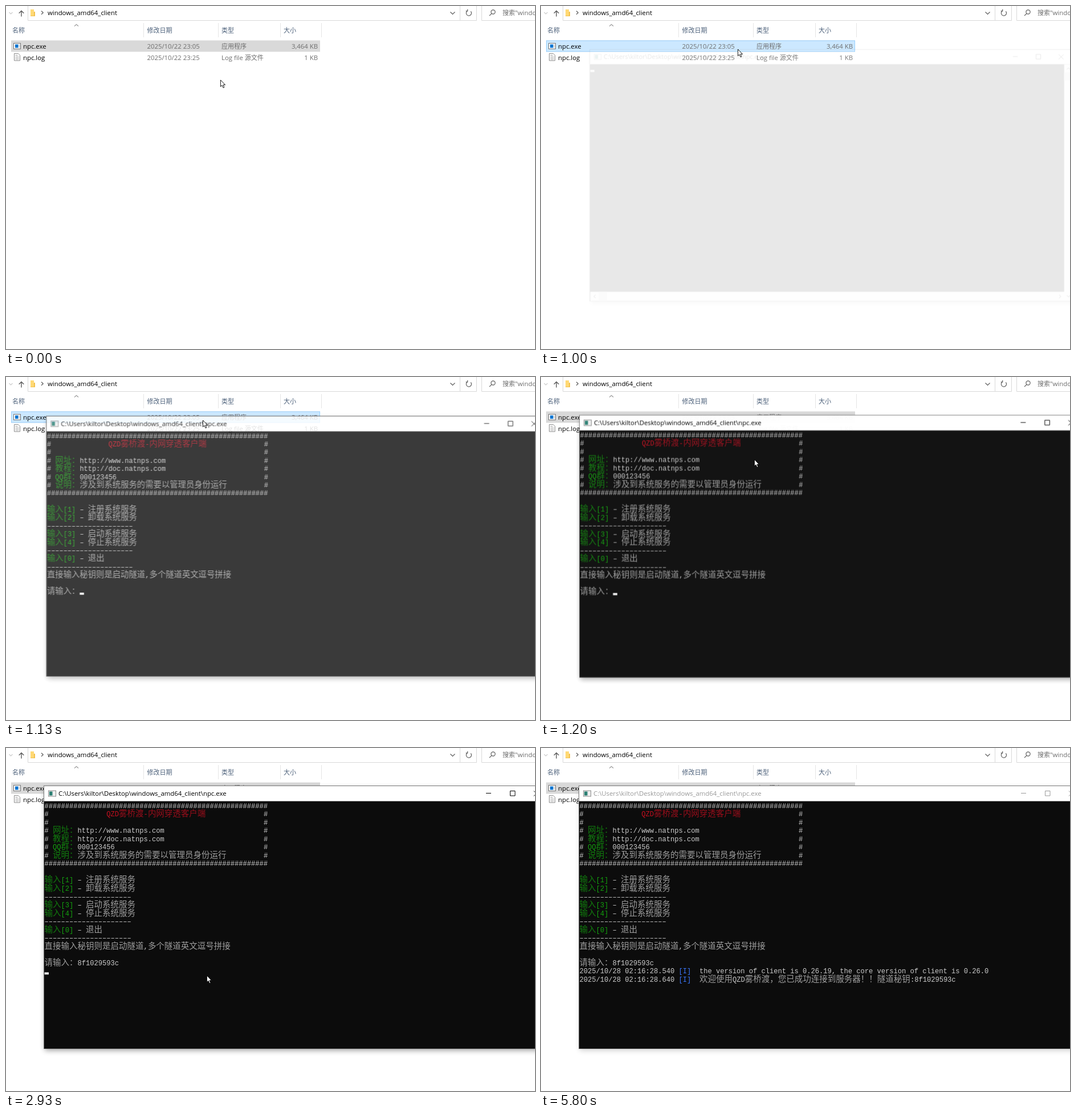
Recreate the animation shown at these times as an HTML page. Size 928x603 px, loop 5.87 s.

```html
<!DOCTYPE html>
<html lang="zh-CN">
<head>
<meta charset="utf-8">
<title>Tunnel client</title>
<style>
html, body { margin: 0; width: 100%; height: 100%; overflow: hidden; background: #fff; }
svg { display: block; }
text { font: 11.35px "Open Sans", "Noto Sans CJK SC", "Noto Sans CJK", sans-serif; white-space: pre; }
.zh { font-size: 11px; }
.head { fill: #4c607a; }
.dim { fill: #6d6d6d; }
.end { text-anchor: end; }
.line { fill: none; stroke: #d9d9d9; }
.icon { fill: none; stroke: #5c5c5c; stroke-width: 1.2; }

.term { font: 12.09px "Liberation Mono", monospace; fill: #ccc; }
.term.wide { font: 300 14.5px "Noto Sans CJK SC", "Noto Sans CJK", sans-serif; fill-opacity: .76; }
.term.red { fill: #c50f1f; }
.term.green { fill: #13a10e; }
.term.blue { fill: #3b78ff; }

.hot, .win, .blank, .screen, .log, .caret, .mouse, .bar, .shadow {
  animation: 5.87s step-end infinite;
}
.hot { opacity: 0; animation-name: hot; }
.win { opacity: 0; transform-origin: 510px 297px; animation-name: open; }
.blank { animation-name: blank; }
.screen { opacity: 0; animation-name: screen; }
.log { opacity: 0; }
#log1 { animation-name: log1; }
#log2 { animation-name: log2; }
#key { animation-name: key; }
.caret { animation-name: caret; }
.bar { color: #000; animation-name: bar; }
.shadow { opacity: .36; animation-name: shadow; }
.mouse { transform: translate(376px, 130px); animation-name: mouse; }

@keyframes hot { 4.59% { opacity: 1 } 20.44% { opacity: 0 } }
@keyframes open {
  17.03% { opacity: .095; transform: scale(.957) }
  18.22% { opacity: .5; transform: scale(.977) }
  19.25% { opacity: .81; transform: scale(.99) }
  20.44% { opacity: .97; transform: scale(.998) }
  21.63%, 100% { opacity: 1; transform: none }
}
@keyframes blank { 18.22%, 100% { opacity: 0 } }
@keyframes screen { 18.22%, 100% { opacity: 1 } }
@keyframes key { 25.04%, 100% { opacity: 1 } }
@keyframes log1 { 52.29%, 100% { opacity: 1 } }
@keyframes log2 { 54.51%, 100% { opacity: 1 } }
@keyframes caret {
  18.22% { transform: translate(58px, 275.9px); opacity: 1 }
  25.04% { transform: translate(130.6px, 275.9px); opacity: 1 }
  34.07% { transform: translate(130.6px, 275.9px); opacity: 0 }
  43.1% { transform: translate(130.6px, 275.9px); opacity: 1 }
  49.91% { transform: translate(0, 290.4px); opacity: 1 }
  52.29% { transform: translate(0, 304.9px); opacity: 1 }
  54.51% { transform: translate(0, 319.9px); opacity: 1 }
  70.35% { transform: translate(0, 319.9px); opacity: 0 }
  80.57% { transform: translate(0, 319.9px); opacity: 1 }
  89.77%, 100% { transform: translate(0, 319.9px); opacity: 0 }
}
@keyframes bar { 97.61%, 100% { color: #999 } }
@keyframes shadow { 98.8%, 100% { opacity: .18 } }
@keyframes mouse {
  1.19% { transform: translate(374px, 127px) }
  2.21% { transform: translate(368px, 113px) }
  3.4% { transform: translate(358px, 95px) }
  4.59% { transform: translate(349px, 80px) }
  6.81% { transform: translate(345px, 76px) }
  20.44% { transform: translate(374px, 145px) }
  21.63% { transform: translate(421px, 256px) }
  22.65% { transform: translate(395px, 339px) }
  23.85% { transform: translate(378px, 372px) }
  25.04% { transform: translate(364px, 391px) }
  26.06% { transform: translate(356px, 397px) }
  27.25% { transform: translate(352px, 399px) }
  29.47% { transform: translate(350px, 399px) }
  30.66% { transform: translate(350px, 400px) }
  34.07% { transform: translate(351px, 400px) }
  35.26% { transform: translate(352px, 400px); opacity: 1 }
  74.95% { transform: translate(372px, 424px); opacity: 1 }
  76.14%, 100% { transform: translate(372px, 424px); opacity: 0 }
}
</style>
</head>
<body>
<svg width="928" height="603" viewBox="0 0 928 603">
  <defs>
    <filter id="blur" x="-10%" y="-10%" width="120%" height="120%"><feGaussianBlur stdDeviation="5"/></filter>
  </defs>
  <rect width="928" height="603" fill="#fff"/>

  <!-- address bar -->
  <path class="line" d="M38.5 0V25.5H825.5V0M796.5 0V25.5M834.5 0V25.5H928"/>
  <path class="icon" style="stroke:#ccc" d="M5.5 11l3 3 3-3"/>
  <path class="icon" style="stroke-width:1.4" d="M27 18.5V8.5M22.7 12.7L27 8.4l4.3 4.3"/>
  <path fill="#ffd975" d="M43 6h6v12h-6z"/>
  <path fill="#f2c14e" d="M49 10h2v8h-2zM43 17h8v1h-8z"/>
  <path class="icon" d="M62 8.8l3.2 3-3.2 3"/>
  <text x="73" y="16">windows_amd64_client</text>
  <path class="icon" d="M779.5 10.5l4 4 4-4"/>
  <path class="icon" d="M815.3 9.3a4.6 4.6 0 1 1-5.6-.9M809.7 5.8v3h-3"/>
  <circle class="icon" cx="854.5" cy="10.5" r="3.6"/>
  <path class="icon" d="M852 13.2l-4 4"/>
  <text class="dim" x="871" y="16"><tspan class="zh">搜索</tspan>"windows_amd64_client"</text>

  <!-- column headers -->
  <path class="line" style="stroke:#e5e5e5" d="M241.5 30v25M372.5 30v25M481.5 30v25M553.5 30v25"/>
  <path class="icon" style="stroke-width:1" d="M120 35.5l3.5-3.2 3.5 3.2"/>
  <g class="head">
    <text class="zh" x="11" y="47">名称</text>
    <text class="zh" x="247.5" y="47">修改日期</text>
    <text class="zh" x="378" y="47">类型</text>
    <text class="zh" x="487" y="47">大小</text>
  </g>

  <!-- file rows -->
  <rect x="9" y="60.5" width="542" height="20" fill="#d9d9d9"/>
  <rect class="hot" x="9.5" y="61" width="541" height="19" fill="#cce8ff" stroke="#99d1ff"/>
  <rect x="13.5" y="65.5" width="12" height="10" fill="#fff" stroke="#777"/>
  <rect x="16" y="67.5" width="5.5" height="6" fill="#0b74d0"/>
  <path stroke="#aaa" d="M22.5 68h2M22.5 70.5h2M22.5 73h2"/>
  <path fill="#fff" stroke="#8c8c8c" d="M14.5 83.5h7l3 3v9.5h-10z"/>
  <path stroke="#aaa" d="M16.5 86.5h4M16.5 89h6M16.5 91.5h6M16.5 94h6"/>
  <text x="30" y="74.7">npc.exe</text>
  <text x="30" y="94.5">npc.log</text>
  <g class="dim">
    <text x="247.5" y="74.7">2025/10/22 23:05</text>
    <text class="zh" x="378" y="74.7">应用程序</text>
    <text class="end" x="547" y="74.7">3,464 KB</text>
    <text x="247.5" y="94.5">2025/10/22 23:25</text>
    <text x="378" y="94.5">Log file <tspan class="zh">源文件</tspan></text>
    <text class="end" x="547" y="94.5">1 KB</text>
  </g>

  <!-- console window -->
  <g class="win">
    <rect class="shadow" x="68" y="71" width="886" height="461" filter="url(#blur)"/>
    <rect x="66.5" y="66.5" width="887" height="462" fill="#fff" stroke="#777"/>
    <rect x="67" y="93.5" width="886" height="435" fill="#0c0c0c"/>
    <rect x="74.5" y="75" width="13" height="10" fill="#eee" stroke="#8a8a8a"/>
    <rect x="76" y="76.5" width="5.5" height="7" fill="#2b7f72"/>
    <g class="bar">
      <text x="92" y="84" fill="currentColor">C:\Users\kiltor\Desktop\windows_amd64_client\npc.exe</text>
      <path fill="none" stroke="currentColor" d="M842 79.5h9M884.5 75.5h8.500v8.500h-8.500zM926 75.5l9 9M935 75.5l-9 9"/>
    </g>
    <g class="blank">
      <path fill="#f0f0f0" d="M936 93.5h16.5v435H67.5v-17H936z"/>
      <path fill="#cdcdcd" d="M936 109h16.5v14H936zM83 511.7h15v16.5H83z"/>
      <path class="icon" d="M77 517l-3 3 3 3M927 517l3 3-3 3M941 103l3-3 3 3M941 518l3 3 3-3"/>
    </g>
    <g class="screen" id="screen"></g>
    <g class="log" id="key"></g>
    <g class="log" id="log1"></g>
    <g class="log" id="log2"></g>
    <rect class="caret" x="67.5" y="104" width="7.5" height="3.8" fill="#f2f2f2"/>
  </g>

  <path class="mouse" fill="#fff" stroke="#000" stroke-width=".9" stroke-linejoin="round"
    d="M.4 0V11.8L3 9.3 5 13.8 6.9 13 5 8.7H8.6z"/>
</svg>
<script>
const CELL = 7.255, LINE = 14.52, LEFT = 67.5, BASE = 105.8;
const isWide = run => run >= '\u2e80';

// Places each narrow or wide run of a line on the console's character grid.
function put(id, row, col, str, color = '') {
  const group = document.getElementById(id);
  for (const run of str.match(/[\u2e80-\uffff]+|[^\u2e80-\uffff]+/g)) {
    const el = document.createElementNS('http://www.w3.org/2000/svg', 'text');
    el.setAttribute('class', `term ${color} ${isWide(run) ? 'wide' : ''}`);
    el.setAttribute('x', LEFT + col * CELL);
    el.setAttribute('y', BASE + row * LINE);
    el.textContent = run;
    group.append(el);
    col += run.length * (isWide(run) ? 2 : 1);
  }
}
const show = (...args) => put('screen', ...args);

for (const row of [0, 7]) show(row, 0, '#'.repeat(54));
for (let row = 1; row < 7; row++) {
  show(row, 0, '#');
  show(row, 53, '#');
}
show(1, 15, 'QZD雾桥渡-内网穿透客户端', 'red');
[
  ['网址：', 'http://www.natnps.com'],
  ['教程：', 'http://doc.natnps.com'],
  ['QQ群：', '000123456'],
  ['说明：', '涉及到系统服务的需要以管理员身份运行'],
].forEach(([label, value], i) => {
  show(3 + i, 2, label, 'green');
  show(3 + i, 8, value);
});
[
  [9, 1, '注册系统服务'], [10, 2, '卸载系统服务'],
  [12, 3, '启动系统服务'], [13, 4, '停止系统服务'],
  [15, 0, '退出'],
].forEach(([row, key, action]) => {
  show(row, 0, `输入[${key}]`, 'green');
  show(row, 8, '– ' + action);
});
for (const row of [11, 14, 16]) show(row, 0, '–'.repeat(21));
show(17, 0, '直接输入秘钥则是启动隧道,多个隧道英文逗号拼接');
show(19, 0, '请输入：');
put('key', 19, 8, '8f1029593c');

function log(id, row, ms, message) {
  put(id, row, 0, '2025/10/28 02:16:28.' + ms);
  put(id, row, 24, '[I]', 'blue');
  put(id, row, 29, message);
}
log('log1', 20, 540, 'the version of client is 0.26.19, the core version of client is 0.26.0');
log('log2', 21, 640, '欢迎使用QZD雾桥渡，您已成功连接到服务器！！隧道秘钥:8f1029593c');
</script>
</body>
</html>
```
